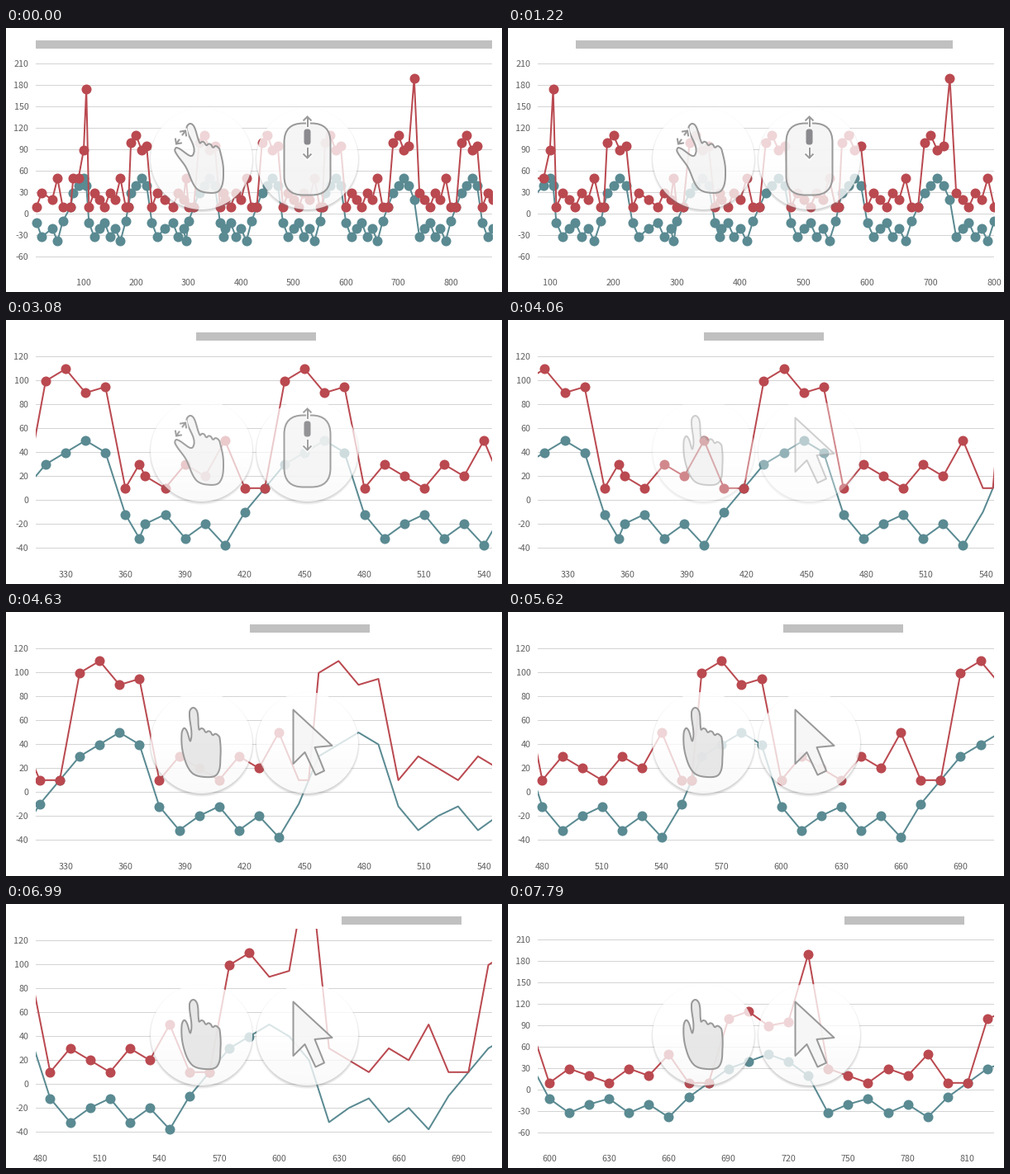
These frames come from a looping animation (600 by 320 pixels, 8 s). A matplotlib script:

```python
import numpy as np
import matplotlib.pyplot as plt
from matplotlib.animation import FuncAnimation
from matplotlib.patches import FancyBboxPatch, Polygon, Rectangle

W, H, DPI = 600, 320, 100
LOOP, STEP = 8000, 20
PT = 72 / DPI

LEFT, RIGHT, TOP, BOTTOM = 36, 588, 30, 290
X_MIN, X_MAX = 10, 880
SPAN = X_MAX - X_MIN
RED, TEAL, INK = "#ba4950", "#5a8a92", "#999999"

# ---- data: a repeating rhythm on a ten-unit raster, with a few odd samples
raster = set(range(X_MIN, X_MAX + 1, 10)) - {30, 70, 250, 260}
xs = np.array(sorted(raster | {75, 105, 185, 255, 295, 367, 555}), float)


def series(calm, burst):
    """A short opening without the second calm part, then six full cycles."""
    cycle = calm * 2 + burst
    return np.array(calm + burst + cycle * 6 + calm, float)


high = series([10, 30, 20], [50, 10, 10, 100, 110, 90, 95])
low = series([-12, -32, -20], [-38, -10, 10, 30, 40, 50, 40])
high[6:10] = 50, 50, 90, 175
high[xs == 730], low[xs == 730] = 190, 20

# ---- motion
ZOOM_START, ZOOM_GAP, ZOOM_STEPS = 1090, 112, 14
ANCHOR = 0.4765
ZOOMED = SPAN / 1.1 ** ZOOM_STEPS
START = X_MIN + ANCHOR * (SPAN - ZOOMED)
MID, END = 478.1, 594.6
DRAG_1, DROP_1, DRAG_2, DROP_2 = 3910, 5620, 6420, 7790


def drag(t, begin, length, start, stop):
    """Eased pull in 30 ms steps, slow at both ends."""
    u = min((t - begin) // 30 * 30 / length, 1)
    return start + (stop - start) * (1 - (1 - u ** 1.56) ** 2.59)


def view(t):
    """Start of the last redraw, current start, width, dragging."""
    if t < DRAG_1:
        n = np.clip((t - ZOOM_START) // ZOOM_GAP + 1, 0, ZOOM_STEPS)
        width = SPAN / 1.1 ** n
        start = X_MIN + ANCHOR * (SPAN - width)
        return start, start, width, False
    if t < DROP_1:
        return START, drag(t, DRAG_1, 1480, START, MID - 1.5), ZOOMED, True
    if t < DRAG_2:
        return MID, MID, ZOOMED, False
    if t < DROP_2:
        return MID, drag(t, DRAG_2, 608, MID, END - 1.2), ZOOMED, True
    return END, END, ZOOMED, False


def nice(v):
    return next(s for s in (10, 20, 30, 50, 100) if s >= v)


# ---- stage, in pixel coordinates
fig = plt.figure(figsize=(W / DPI, H / DPI), dpi=DPI, facecolor="white")
ax = fig.add_axes([0, 0, 1, 1])
ax.axis("off")


def clip_box(x0, x1):
    box = Rectangle((x0 - .5, TOP - .5), x1 - x0, BOTTOM - TOP,
                    fc="none", ec="none")
    return ax.add_patch(box)


line_clip = clip_box(LEFT, RIGHT)
dot_clip = clip_box(20, RIGHT)

bar = ax.add_patch(Rectangle((0, 14.5), 1, 10, fc="#c0c0c0", ec="none", lw=0))
grid, = ax.plot([], [], color="#d4d4d4", lw=PT, zorder=1,
                solid_capstyle="butt", snap=False)


def plot_pair(color, z):
    line, = ax.plot([], [], color=color, lw=2 * PT, zorder=z)
    dots, = ax.plot([], [], "o", color=color, ms=12 * PT, mew=0, zorder=z + .5)
    line.set_clip_path(line_clip)
    return line, dots


pairs = [(low, *plot_pair(TEAL, 2)), (high, *plot_pair(RED, 3))]


def labels(n, align):
    return [ax.text(0, 0, "", family="Noto Sans CJK JP", size=10.7 * PT,
                    color="#606060", ha=align, va="baseline") for _ in range(n)]


x_labels, y_labels = labels(14, "center"), labels(14, "right")


def fill_labels(pool, items):
    for i, text in enumerate(pool):
        shown = i < len(items)
        text.set_visible(shown)
        if shown:
            x, y, value = items[i]
            text.set_position((x, y))
            text.set_text(f"{value:d}")


# ---- round badges with a soft shadow
def badge(cx, cy, r=61.5, pad=68):
    x0, y0, n = cx - pad, cy - pad, 2 * pad
    yy, xx = np.mgrid[y0:y0 + n, x0:x0 + n]
    disc = np.clip(r - np.hypot(xx - cx, yy - cy) + .5, 0, 1)
    shade = .42 * np.clip((r + 2.2 - np.hypot(xx - cx, yy - cy - 2)) / 4.5, 0, 1)
    cover, rest = .78 * disc, (1 - disc) * shade
    alpha = cover + rest
    tone = 1 - .025 * np.clip((yy - cy) / r, 0, 1)
    grey = (cover * tone + rest * .45) / np.maximum(alpha, 1e-6)
    rgba = np.dstack([np.clip(grey, 0, 1)] * 3 + [alpha])
    img = ax.imshow(rgba, extent=(x0 - .5, x0 + n - .5, y0 + n - .5, y0 - .5),
                    interpolation="nearest", aspect="auto", zorder=5)
    return img, rgba


badges = [badge(236, 158), badge(364, 158)]


# ---- icons
def smooth(points, n=8):
    """Closed curve through the points, tangents scaled to each span."""
    p = np.array(points, float)
    tan = np.roll(p, -1, axis=0) - np.roll(p, 1, axis=0)
    tan /= np.linalg.norm(tan, axis=1, keepdims=True)
    q, tan_q = np.roll(p, -1, axis=0), np.roll(tan, -1, axis=0)
    span = np.linalg.norm(q - p, axis=1, keepdims=True)
    p, q, a, b = (v[:, None] for v in (p, q, tan * span, tan_q * span))
    u = np.linspace(0, 1, n, endpoint=False)[None, :, None]
    curve = (p * (1 + 2 * u) * (1 - u) ** 2 + a * u * (1 - u) ** 2
             + q * u * u * (3 - 2 * u) - b * u * u * (1 - u))
    return curve.reshape(-1, 2)


def knuckles(x0, y0, x1, y1):
    u = np.linspace(0, 1, 10)
    bump = 3 * np.abs(np.sin(3 * np.pi * u))
    return list(zip(x0 + (x1 - x0) * u, y0 + (y1 - y0) * u - bump))


def shape(points, fill, opacity):
    body = ax.add_patch(Polygon(points, fc=fill, ec="none", lw=0, zorder=6))
    edge = ax.add_patch(Polygon(points, fc="none", ec=INK, lw=2 * PT,
                                joinstyle="round", zorder=7))
    return [(body, opacity), (edge, 1)]


def rounded(x, y, w, h, r, z, **style):
    return ax.add_patch(FancyBboxPatch(
        (x, y), w, h, boxstyle=f"round,pad=0,rounding_size={r}", zorder=z, **style))


def stroke(points, color=INK, width=2, z=9):
    x, y = zip(*points)
    line, = ax.plot(x, y, color=color, lw=width * PT, zorder=z,
                    solid_capstyle="butt", solid_joinstyle="miter")
    return line, 1


def arrow(tip, angle, length, wing=7):
    """Shaft and open head, pointing along the angle."""
    def back(size, turn=0):
        a = np.radians(angle + turn)
        return tip[0] - size * np.cos(a), tip[1] - size * np.sin(a)
    shaft, head = [back(length), tip], [back(wing, -45), tip, back(wing, 45)]
    return [stroke(shaft, "white", 5, 8), stroke(head, "white", 5, 8),
            stroke(shaft), stroke(head)]


def mouse():
    body = rounded(336, 115, 56, 87, 23, 6, fc="#f2f2f2", ec="none", lw=0)
    edge = rounded(336, 115, 56, 87, 23, 7, fc="none", ec=INK, lw=2 * PT)
    wheel = rounded(360, 122, 8, 19, 3.5, 9, fc="#8a8a8e", ec="none", lw=0)
    return ([(body, .75), (edge, 1), (wheel, 1)]
            + arrow((364, 107), -90, 12) + arrow((364, 157), 90, 13))


pinch = ([(218, 121), (222, 115.5), (227, 119)] + knuckles(234, 139, 258, 147)
         + [(262.5, 172), (258, 196), (242, 199), (229, 193),
            (217, 168), (204, 149), (206, 144.5), (226, 153)])
point = ([(221.5, 121), (226, 115.5), (231, 121)] + knuckles(233, 142, 258, 152)
         + [(259, 174), (255, 196), (240, 199.5), (224, 194),
            (214, 172), (212, 147), (216, 140.5), (223, 155)])
cursor = [(347, 118), (347, 183.5), (361, 169.5), (374, 197),
          (384.5, 192), (373, 163.5), (394, 161.5)]

zoom_icons = (shape(smooth(pinch), "#f2f2f2", .75) + mouse()
              + arrow((216.5, 124), -55, 7) + arrow((205.5, 140), 125, 7))
pan_icons = shape(smooth(point), "#e4e4e4", .85) + shape(cursor, "#f5f5f5", .85)

ax.set_xlim(-.5, W - .5)
ax.set_ylim(H - .5, -.5)


def fade(group, level):
    for artist, opacity in group:
        artist.set_visible(level > 0)
        artist.set_alpha(opacity * level)


def overlay(t):
    out = 1 - np.clip((t - 3080) // 30 + 1, 0, 12) / 12
    back = np.clip((t - DRAG_1) // 30, 0, 11) / 11
    fade(zoom_icons, out)
    fade(pan_icons, back)
    level = max(out, back)
    for img, rgba in badges:
        img.set_visible(level > 0)
        img.set_data(rgba * [1, 1, 1, level])


def draw(frame):
    t = frame * STEP + STEP // 2
    base, now, width, dragging = view(t)
    scale = (RIGHT - LEFT) / width

    seen = (xs >= base - .01) & (xs <= base + width + .01)
    y_lo, y_hi = low[seen].min(), high[seen].max()
    step = nice((y_hi - y_lo) / 9)
    first = int(np.floor(y_lo / step)) * step
    last = int(np.ceil(y_hi / step)) * step
    unit = (BOTTOM - TOP) / (last - first + step)

    def to_x(v, start):
        return LEFT + .4 + (v - start) * scale

    def to_y(v):
        return TOP + (last + step / 2 - v) * unit

    rows = [(v, round(to_y(v))) for v in range(first, last + 1, step)]
    grid.set_data(np.tile([LEFT - .5, RIGHT - .5, np.nan], len(rows)),
                  np.repeat([y for _, y in rows], 3))
    fill_labels(y_labels, [(26.8, y + 3.5, v) for v, y in rows])

    gap = nice(width / 9)
    columns = range(int(np.ceil(base / gap)) * gap, int(base + width) + 1, gap)
    fill_labels(x_labels, [(to_x(v, base), 311.5, v) for v in columns])

    px = to_x(xs, now)
    for values, line, dots in pairs:
        py = to_y(values)
        line.set_data(px, py)
        dots.set_data(px[seen], py[seen])
        dots.set_clip_path(line_clip if dragging else dot_clip)

    ratio = (RIGHT - LEFT) / SPAN
    bar.set_x(round(LEFT + (now - X_MIN) * ratio) - .5)
    bar.set_width(round(width * ratio))
    overlay(t)
    return []


anim = FuncAnimation(fig, draw, frames=LOOP // STEP, interval=STEP,
                     init_func=lambda: draw(0), repeat=True, repeat_delay=0,
                     blit=False)
plt.show()
```
